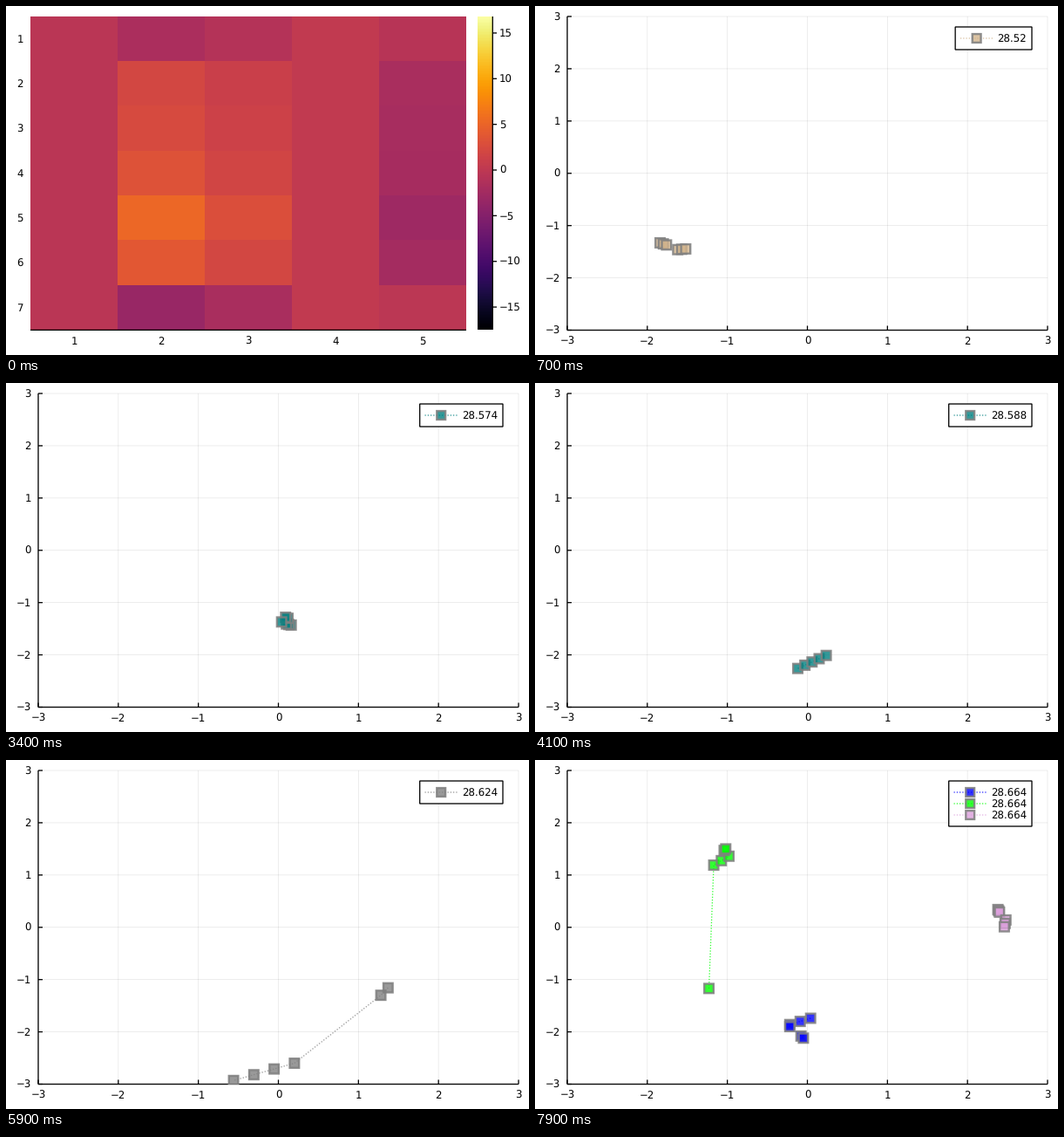
Animation, 600 px wide and 400 px high, one loop 8 s. Source, as a matplotlib script:

```python
import numpy as np
import matplotlib
import matplotlib.pyplot as plt
from matplotlib.animation import FuncAnimation
from matplotlib.colors import to_rgba
from matplotlib.patches import Rectangle

matplotlib.rcParams["font.family"] = "DejaVu Sans"
matplotlib.rcParams["text.hinting"] = "none"
DPI = 100
PX = 72 / DPI
FRAMES, STEP = 80, 100
TRAIL = 6
LEFT, RIGHT, TOP, BOTTOM = 37, 588, 12, 371.5
LOW, HIGH = -17.5, 16.8

# each row's strength spreads over the columns with its own gain and bias
ROWS = [-2, 1.8, 2.2, 3, 5, 3.5, -3.6]
GAIN = [0, 1, 0.55, 0, -0.3]
BIAS = [-0.4, 0.2, 0.1, 0.2, -1.3]
HEAT = np.outer(ROWS, GAIN) + BIAS

# colour, frame of first point, first and last frame on show,
# key points (x + yj) by step along the path
TRACKS = [
    ("tan", 2, 2, 19, {
        0: -1.84 - 1.33j, 2: -1.76 - 1.37j, 3: -1.62 - 1.46j,
        6: -1.47 - 1.44j, 7: -0.18 + 2.25j, 8: 0.22 + 2.15j,
        10: -0.10 + 1.95j, 11: 0.04 + 1.82j, 12: -0.19 + 1.74j,
        13: -0.14 + 1.73j}),
    ("teal", 24, 24, 39, {
        0: 0.50 - 1.76j, 5: 0.16 - 1.43j, 7: 0.10 - 1.41j,
        8: 0.12 - 1.30j, 9: 0.09 - 1.28j, 10: 0.04 - 1.37j,
        15: -0.39 - 1.85j}),
    ("teal", 37, 37, 46, {0: -0.12 - 2.26j, 9: 0.68 - 1.70j}),
    ("gray", 51, 51, 61, {
        0: 1.64 - 0.73j, 4: 1.28 - 1.30j, 5: 0.20 - 2.60j, 8: -0.56 - 2.93j}),
    ("blue", 73, 78, 79, {
        0: -2.58 - 1.50j, 1: 0.04 - 1.74j, 3: -0.22 - 1.86j,
        4: -0.22 - 1.90j, 5: -0.08 - 2.08j, 6: -0.05 - 2.12j}),
    ("lime", 73, 73, 79, {
        0: -1.70 - 1.63j, 1: -1.23 - 1.17j, 2: -1.17 + 1.19j,
        4: -0.98 + 1.36j, 5: -1.04 + 1.47j, 6: -1.02 + 1.50j}),
    ("plum", 62, 62, 79, {
        0: -0.57 + 1.70j, 2: -0.38 + 1.52j, 3: -0.31 + 1.51j,
        5: 0.18 + 1.68j, 12: 2.38 + 0.34j, 14: 2.40 + 0.29j,
        15: 2.48 + 0.14j, 17: 2.46 + 0.01j}),
]

fig = plt.figure(figsize=(600 / DPI, 400 / DPI), dpi=DPI, facecolor="white")
ax = fig.add_axes([0, 0, 1, 1])


def line(x, y, color="black", width=1.3, **kw):
    return ax.plot(x, y, color=color, lw=width * PX, snap=False,
                   solid_capstyle="butt", **kw)[0]


def dotted(x, y, color, **kw):
    return line(x, y, to_rgba(color, 0.8), linestyle=(0, (1, 1.5)),
                dash_capstyle="butt", **kw)


def box(x, y, w, h, **kw):
    return ax.add_patch(Rectangle((x, y), w, h, snap=False, **kw))


def square(x, y, size, color, **kw):
    return box(x - size / 2, y - size / 2, size, size, lw=2.4 * PX,
               facecolor=to_rgba(color, 0.8),
               edgecolor=to_rgba("gray", 0.88), **kw)


def text(x, y, s, ha="center"):
    ax.text(x, y - 0.5, s, ha=ha, va="center_baseline", fontsize=11.7 * PX)


def number(v):
    return str(v).replace("-", "\u2212")


def sx(x):
    return LEFT + (x + 3) * (RIGHT - LEFT) / 6


def sy(y):
    return BOTTOM - (y + 3) * (BOTTOM - TOP) / 6


def heat(values, left, right):
    ax.imshow(values, cmap="inferno", vmin=LOW, vmax=HIGH, aspect="auto",
              interpolation="nearest", extent=(left, right, 371, 12))


def draw_heatmap():
    heat(HEAT, 28, 528)
    heat(np.linspace(HIGH, LOW, 256)[:, None], 541, 558)
    line([28, 528], [371.4, 371.4])
    line([558.3, 558.3], [12, 371])
    for i in range(5):
        text(78 + 100 * i, 383.5, str(i + 1))
    for i in range(7):
        text(20, 38 + 51.3 * i, str(i + 1), "right")
    for v in range(-15, 16, 5):
        y = 188 - 10.47 * v
        line([558, 563], [y, y])
        text(566, y, number(v), "left")


def draw_axes():
    for v in range(-3, 4):
        x, y = sx(v), sy(v)
        line([x, x], [TOP, BOTTOM], (0, 0, 0, 0.1), 0.7)
        line([LEFT, RIGHT], [y, y], (0, 0, 0, 0.1), 0.7)
        line([x, x], [BOTTOM, BOTTOM - 5])
        line([LEFT, LEFT + 5], [y, y])
        text(x, 383.5, number(v))
        text(29, y + 0.3, number(v), "right")
    line([LEFT, LEFT], [TOP, BOTTOM])
    line([LEFT, RIGHT], [BOTTOM, BOTTOM])


def draw_trail(color, pts, layer):
    x, y = sx(pts.real), sy(pts.imag)
    parts = [dotted(x, y, color, zorder=layer)]
    parts += [square(px, py, 10.6, color, zorder=layer)
              for px, py in zip(x, y)]
    frame = Rectangle((LEFT, TOP), RIGHT - LEFT, BOTTOM - TOP,
                      transform=ax.transData)
    for part in parts:
        part.set_clip_path(frame)


def draw_legend(entries):
    labels = [str(round(28.506 + 0.002 * k, 3)) for _, k, _ in entries]
    left = 474.7 + 7.45 * (6 - max(map(len, labels)))
    box(left, 24, 570 - left, 13 * len(entries) + 13, facecolor="white",
        edgecolor="black", lw=1.3 * PX, zorder=20)
    for i, (color, _, _) in enumerate(entries):
        y = 37 + 13 * i
        dotted([left + 5.8, left + 43.3], [y, y], color, zorder=21)
        square(left + 24.5, y, 9.8, color, zorder=22)
        ax.texts and text(left + 48.2, y + 0.3, labels[i], "left")
    for label in ax.texts:
        label.set_zorder(23)


def trail(start, keys, k):
    steps = np.arange(max(0, k - start - TRAIL + 1), k - start + 1)
    return np.interp(steps, list(keys), list(keys.values()))


def entries_at(k):
    if 20 <= k < 24:
        k = 19
    if 47 <= k < 51:
        k = 46
    # the first track piles its trails up from frame 10 on
    shown = range(10, k + 1) if 10 <= k <= 19 else [k]
    return [(color, j, trail(start, keys, j))
            for j in shown
            for color, start, first, last, keys in TRACKS
            if first <= j <= last]


def draw(k):
    ax.clear()
    ax.axis("off")
    if k < 2:
        draw_heatmap()
    else:
        draw_axes()
        entries = entries_at(k)
        for layer, (color, _, pts) in enumerate(entries, 5):
            draw_trail(color, pts, layer)
        draw_legend(entries)
    ax.set_aspect("auto")
    ax.set_xlim(0, 600)
    ax.set_ylim(400, 0)
    return []


anim = FuncAnimation(fig, draw, frames=FRAMES, interval=STEP,
                     init_func=lambda: draw(0), repeat=True, repeat_delay=0)
plt.show()
```
